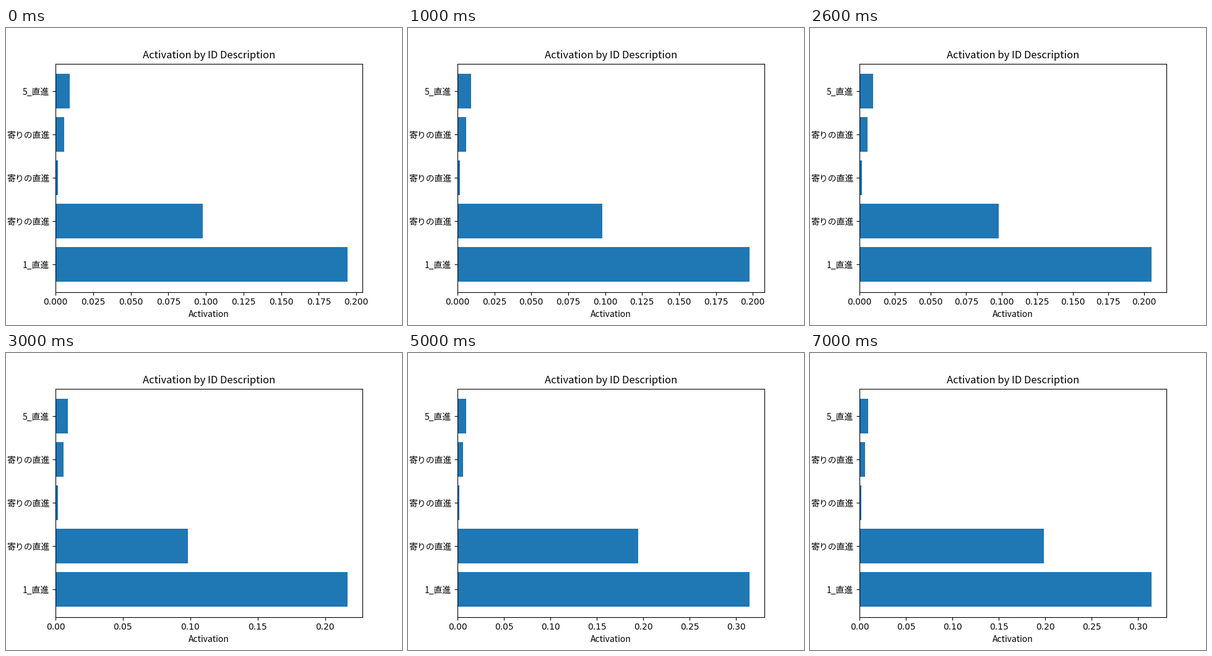
Animation, 640 px wide and 480 px high, one loop 8000 ms. Source, as a matplotlib script:

```python
import matplotlib.pyplot as plt
from matplotlib.animation import FuncAnimation

TEXT = dict(fontfamily="Noto Sans CJK JP", fontweight=350)
LABELS = ["1_直進", "寄りの直進", "寄りの直進", "寄りの直進", "5_直進"]
STEADY = [0.00175, 0.0058, 0.0094]
# One reading per second for the two lowest bars.
FIRST = [0.1943, 0.1980, 0.2056, 0.2169, 0.3149, 0.3149, 0.3149, 0.3149]
SECOND = [0.09805] * 5 + [0.1946, 0.1946, 0.1986]

fig, ax = plt.subplots(figsize=(6.4, 4.8), dpi=100)
bars = ax.barh(range(5), [FIRST[0], SECOND[0], *STEADY], color="#1f77b4")
ax.set_yticks(range(5), LABELS, **TEXT)
ax.set_ylim(-0.64, 4.64)
ax.tick_params(axis="x", pad=2.8)
ax.set_title("Activation by ID Description", **TEXT)
ax.set_xlabel("Activation", **TEXT)


def update(second):
    bars[0].set_width(FIRST[second])
    bars[1].set_width(SECOND[second])
    ax.set_xlim(0, FIRST[second] * 1.05)
    return bars.patches


anim = FuncAnimation(fig, update, frames=len(FIRST), interval=1000,
                     repeat=True, repeat_delay=0, blit=False)
plt.show()
```
